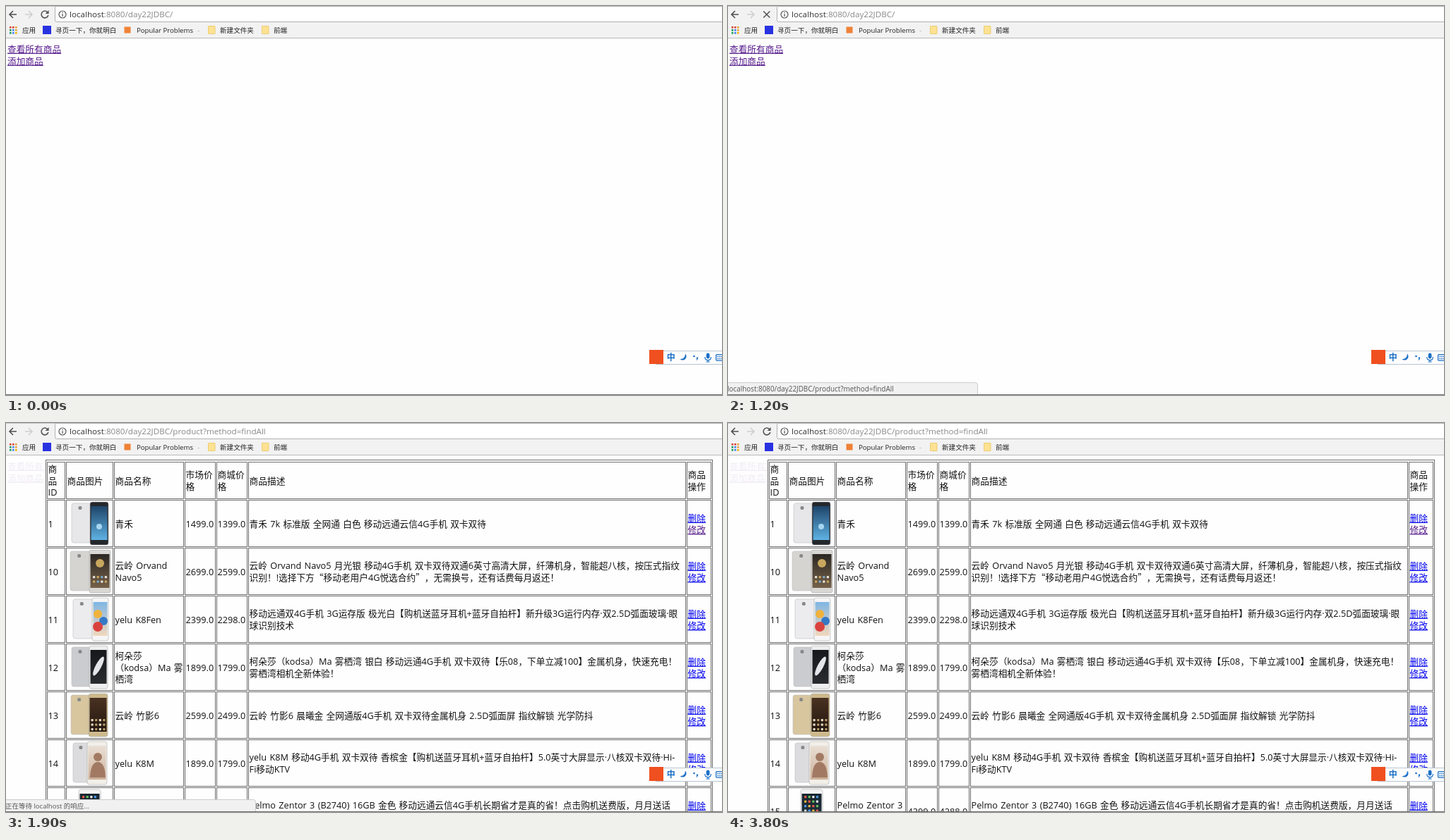
Write an HTML page that moves like this. It is 1014x552 px and loops after 3900 ms.

```html
<!DOCTYPE html>
<html lang="zh-CN">
<head>
<meta charset="utf-8">
<title>商品列表</title>
<style>
  html, body { margin: 0; width: 100%; height: 100%; overflow: hidden; background: #fefefe; }
  svg { display: block; }
  text { font-family: 'Open Sans', 'Noto Sans CJK SC', 'Noto Sans CJK', sans-serif; white-space: pre; text-spacing-trim: space-all; }
  .page { font-size: 12.7px; word-spacing: 1px; fill: #111; }
  .cjk { font-family: 'Noto Sans CJK SC', 'Noto Sans CJK', sans-serif; }
  .mid { font-family: 'Noto Sans CJK TC', 'Noto Sans CJK SC', sans-serif; }
  .bar { font-size: 9.6px; fill: #222; }
  .url { font-size: 11.65px; }
  .link { fill: #0000ee; text-decoration: underline; }
  .seen { fill: #551a8b; }
  .press { fill: #ee0000; }
  .line { fill: none; stroke: #555; stroke-width: 1.6; }
  .cell { fill: none; stroke: #6c6c6c; }
</style>
</head>
<body>
<svg id="stage" width="1014" height="552" viewBox="0 0 1014 552"></svg>
<script>
const COLS = [[58, 84], [85, 152], [153, 252], [253, 297], [298, 342], [343, 963], [964, 999]];
const HEAD = ['商|品|ID', '商品图片', '商品名称', '市场价|格', '商城价|格', '商品描述', '商品|操作'];
const GOODS = [
  ['1', '青禾', '1499.0', '1399.0', '青禾 7k 标准版 全网通 白色 移动远通云信4G手机 双卡双待'],
  ['10', '云岭 Orvand|Navo5', '2699.0', '2599.0', '云岭 Orvand Navo5 月光银 移动4G手机 双卡双待双通6英寸高清大屏，纤薄机身，智能超八核，按压式指纹|识别！!选择下方“移动老用户4G悦选合约”，无需换号，还有话费每月返还！'],
  ['11', 'yelu K8Fen', '2399.0', '2298.0', '移动远通双4G手机 3G运存版 极光白【购机送蓝牙耳机+蓝牙自拍杆】新升级3G运行内存·双2.5D弧面玻璃·眼|球识别技术'],
  ['12', '柯朵莎|（kodsa）Ma 雾|栖湾', '1899.0', '1799.0', '柯朵莎（kodsa）Ma 雾栖湾 银白 移动远通4G手机 双卡双待【乐08，下单立减100】金属机身，快速充电！|雾栖湾相机全新体验！'],
  ['13', '云岭 竹影6', '2599.0', '2499.0', '云岭 竹影6 晨曦金 全网通版4G手机 双卡双待金属机身 2.5D弧面屏 指纹解锁 光学防抖'],
  ['14', 'yelu K8M', '1899.0', '1799.0', 'yelu K8M 移动4G手机 双卡双待 香槟金【购机送蓝牙耳机+蓝牙自拍杆】5.0英寸大屏显示·八核双卡双待·Hi-|Fi移动KTV'],
  ['15', 'Pelmo Zentor 3|(B2740)', '4399.0', '4288.0', 'Pelmo Zentor 3 (B2740) 16GB 金色 移动远通云信4G手机长期省才是真的省！点击购机送费版，月月送话|费，月月享优惠！']
];

const rect = (x, y, w, h, fill, more = '') => `<rect x="${x}" y="${y}" width="${w}" height="${h}" fill="${fill}" ${more}/>`;
const circle = (x, y, r, fill) => `<circle cx="${x}" cy="${y}" r="${r}" fill="${fill}"/>`;
const path = (d, more = 'class="line"') => `<path d="${d}" ${more}/>`;
// Wide quotes, and commas and exclamation marks centred in their square
const wide = str => str.replace(/[“”]/g, '<tspan class="cjk">$&</tspan>').replace(/[，！]/g, '<tspan class="mid">$&</tspan>');
const text = (x, y, str, cls, more = '') => `<text x="${x}" y="${y}" class="${cls}" ${more}>${wide(str)}</text>`;
// Lines of text centred on cy
const lines = (x, cy, str, cls = 'page') => str.split('|').map((s, i, all) =>
  text(x, cy + 4.6 + (i - (all.length - 1) / 2) * 16.6, s, cls)).join('');

const dots = (x, y, cols, rows, colors) => Array.from({ length: cols * rows }, (_, i) =>
  rect(x + i % cols * 5.6, y + Math.floor(i / cols) * 6.5, 3.2, 3.2, colors[i % colors.length], 'rx=".8"')).join('');

function phone(id, cy, [bx, bw, back, fx, fw, body, top, low]) {
  const h = 61, y = cy - 31;
  const rear = bw ? rect(bx, y + 2, bw, h - 5, back, 'rx="3" stroke="#bdbdbd" stroke-width=".6"') +
    rect(bx + bw * .35, y + 6, 5, 5, '#888', 'rx="2"') : '';
  return `<linearGradient id="${id}" x2="0" y2="1"><stop stop-color="${top}"/><stop offset="1" stop-color="${low}"/></linearGradient>` +
    rear + rect(fx, y, fw, h, body, 'rx="3" stroke="#aaa" stroke-width=".6"') +
    rect(fx + 1.5, y + 6, fw - 3, h - 13, `url(#${id})`);
}

const PHONES = [
  [93, 27, '#e7e7e9', 119, 26, '#24272c', '#1f4468', '#5fb2e4'],
  [91, 29, '#d6d4d1', 118, 30, '#d9d7d4', '#2b2723', '#75614a'],
  [95, 28, '#ececee', 122, 23, '#f5f5f6', '#7fb6e3', '#f1d8bd'],
  [93, 27, '#cbccd0', 118, 26, '#eeeeef', '#17181b', '#2b2c30'],
  [92, 26, '#d8c69f', 117, 27, '#cdb98c', '#4a3222', '#21160f'],
  [95, 24, '#dcdcde', 115, 28, '#f2efe9', '#e9dfd4', '#cdb09a'],
  [0, 0, '', 103, 31, '#f4f4f4', '#182630', '#243845']
];
const EXTRAS = [
  cy => circle(132, cy + 4, 4, '#a8d5f0'),
  cy => circle(133, cy - 12, 6, '#c7a65e') + dots(123, cy + 6, 4, 2, ['#e8e2d8', '#c7a65e', '#7da7c4']),
  cy => circle(130, cy - 8, 6, '#f0b23c') + circle(138, cy + 2, 6, '#3579c6') + circle(130, cy + 10, 7, '#d9433f'),
  cy => `<ellipse cx="131" cy="${cy - 2}" rx="4" ry="15" fill="#e3e5e8" transform="rotate(28 131 ${cy - 2})"/>`,
  cy => dots(120.5, cy + 5, 4, 3, ['#e9dcc4', '#b99a6a']),
  cy => circle(130, cy - 9, 6, '#a27a63') + path(`M119 ${cy + 20}q1-22 11-22t11 22z`, 'fill="#a27a63"'),
  cy => dots(108, cy - 22, 4, 5, ['#e8574a', '#62c25a', '#f0f0f0', '#4c9be8', '#f2b93d'])
];

function row(cells, cy, h, top) {
  return COLS.map(([l, r]) => rect(l + .5, top + .5, r - l - 1, h, 'none', 'class="cell"')).join('') +
    cells.map((s, i) => s ? lines(COLS[i][0] + 1.6, cy, s) : '').join('');
}

function table() {
  let out = rect(56.5, 52.5, 944, 600, '#fefefe', 'stroke="#6c6c6c"') + row(HEAD, 82, 52, 55);
  GOODS.forEach(([id, name, list, price, about], i) => {
    const cy = 143 + 68 * i;
    out += row([id, '', name, list, price, about], cy, 66, 109 + 68 * i) +
      phone('screen' + i, cy, PHONES[i]) + EXTRAS[i](cy) +
      lines(965.5, cy - 8, '删除', 'page link') +
      lines(965.5, cy + 8.5, '修改', i ? 'page link' : 'page link seen');
  });
  return out;
}

function chrome() {
  const hues = ['#db4437', '#db4437', '#e8a33d', '#1f9d58', '#4285f4', '#e8a33d', '#1f9d58', '#4285f4', '#f0b400'];
  const apps = hues.map((c, i) => rect(5 + i % 3 * 4, 29 + Math.floor(i / 3) * 4, 2.6, 2.6, c)).join('');
  const folder = x => rect(x, 28.5, 9.5, 11, '#fde293', 'stroke="#ebc55c" stroke-width=".8" rx=".6"');
  const arrow = (x, dir, color) => path(`M${x - 5 * dir} 12h${10 * dir}M${x} 7l${-5 * dir} 5 ${5 * dir} 5`,
    `fill="none" stroke="${color}" stroke-width="1.6"`);
  return rect(0, 0, 1014, 45, '#f2f2f2') + rect(0, 0, 1014, 1, '#c4c4c4') + rect(0, 45, 1014, 1, '#b8b8b8') +
    rect(69.5, .5, 960, 22, '#fff', 'rx="2" stroke="#b0b0b0"') +
    arrow(10, 1, '#505050') + arrow(32, -1, '#cfcfcf') +
    `<g id="reload">${path('M58.6 8.6A4.9 4.9 0 1 0 59.8 13')}${path('M60.6 6v5h-5z', 'fill="#555"')}</g>` +
    `<g id="stop">${path('M50.3 7.5l9 9m0-9l-9 9')}</g>` +
    '<circle cx="80" cy="12" r="5" class="line" style="stroke-width:1.2"/>' + rect(79.4, 11.2, 1.3, 3.6, '#555') + rect(79.4, 8.8, 1.3, 1.3, '#555') +
    '<text x="90" y="16" class="url" fill="#333">localhost<tspan id="path" fill="#888"></tspan></text>' +
    apps + text(23, 38, '应用', 'bar') +
    rect(52, 28, 12, 12, '#2932e1') + text(70, 38, '寻页一下，你就明白', 'bar') +
    rect(167.5, 29.5, 9, 9, '#ef8236') + text(185, 38, 'Popular Problems', 'bar') + text(271, 38, '-', 'bar', 'opacity=".35"') +
    folder(286.5) + text(303, 38, '新建文件夹', 'bar') + folder(362.5) + text(379, 38, '前端', 'bar');
}

function inputBar() {
  const blue = 'fill="#1b70c6"';
  return rect(920.5, 489.5, 110, 19, '#fdfdfe', 'stroke="#b9c6d2"') + rect(911, 488, 20, 20, '#f0501f') +
    text(935.8, 503.4, '中', 'cjk', blue + ' font-size="12" font-weight="700"') +
    path('M962 493.5a5.2 5.2 0 1 1-7.5 7.5q7 .5 7.5-7.5z', blue) +
    circle(974.5, 497, 1.3, '#1b70c6') + path('M977.8 498.5h2.4q.4 3-2.2 4.5l-.5-.8q1-.7 .9-1.7h-.6z', blue) +
    rect(991.7, 492.5, 4.8, 8, '#1b70c6', 'rx="2.4"') +
    path('M989.8 498q0 4.7 4.3 4.7t4.3-4.7M994.1 502.7v2.6M991.5 505h5.2', 'fill="none" stroke="#1b70c6" stroke-width="1.2"') +
    rect(1005.6, 494.6, 14, 8.5, 'none', 'stroke="#1b70c6" stroke-width="1.3" rx="1"') +
    path('M1007.5 497.5h7M1007.5 500.5h7', 'stroke="#1b70c6" stroke-width="1.3" stroke-dasharray="1.6 1"');
}

const $ = id => document.getElementById(id);
$('stage').innerHTML = rect(0, 0, 1014, 552, '#fefefe') +
  `<g id="home"><g id="first">${lines(2, 61, '查看所有商品', 'page link seen')}</g>${lines(2, 78, '添加商品', 'page link seen')}</g>` +
  `<g id="list">${table()}</g>` + chrome() +
  `<g id="tip">${path('M-1 534.5H350.5q3 0 3 3V551.5H-1z', 'fill="#f1f1f1" stroke="#cbcbcb"')}<text id="note" x="-1" y="546.5" fill="#555"></text></g>` +
  inputBar() + rect(0, 551, 1014, 1, '#666a6a');

const ROOT = ':8080/day22JDBC/', FIND = ROOT + 'product?method=findAll';
const ADD_TIP = 'localhost' + ROOT + 'add.jsp', FIND_TIP = 'localhost' + FIND;
const WAIT_TIP = '正在等待 localhost 的响应...';

// time, path, loading, list shown, tip, tip opacity, link pressed
const STEPS = [
  [0, ROOT, 0, 0, '', 0, 0],
  [700, ROOT, 0, 0, ADD_TIP, .28, 0],
  [800, ROOT, 0, 0, ADD_TIP, 1, 0],
  [1100, ROOT, 0, 0, FIND_TIP, 1, 1],
  [1200, ROOT, 1, 0, FIND_TIP, 1, 0],
  [1600, ROOT, 1, 0, WAIT_TIP, 1, 0],
  [1800, FIND, 1, 0, WAIT_TIP, 1, 0],
  [1900, FIND, 0, 1, WAIT_TIP, 1, 0],
  [2100, FIND, 0, 1, WAIT_TIP, .66, 0],
  [2200, FIND, 0, 1, WAIT_TIP, .33, 0],
  [2300, FIND, 0, 1, '', 0, 0]
];
const LOOP = 3900;
const show = (id, on) => $(id).setAttribute('visibility', on ? 'visible' : 'hidden');
let shown;

function draw(now) {
  const t = now % LOOP;
  const step = STEPS.findLast(s => s[0] <= t);
  if (step === shown) return;
  shown = step;
  const [, url, busy, list, tip, fade, press] = step;
  $('path').textContent = url;
  show('stop', busy);
  show('reload', !busy);
  show('list', list);
  $('home').setAttribute('opacity', list ? .08 : 1);
  $('first').firstChild.setAttribute('class', 'page link ' + (press ? 'press' : 'seen'));
  $('note').textContent = tip;
  $('note').setAttribute('font-size', tip === WAIT_TIP ? 9.5 : 9.9);
  $('tip').setAttribute('opacity', fade);
}

const start = performance.now();
function tick() {
  draw(performance.now() - start);
  requestAnimationFrame(tick);
}
tick();
</script>
</body>
</html>
```
